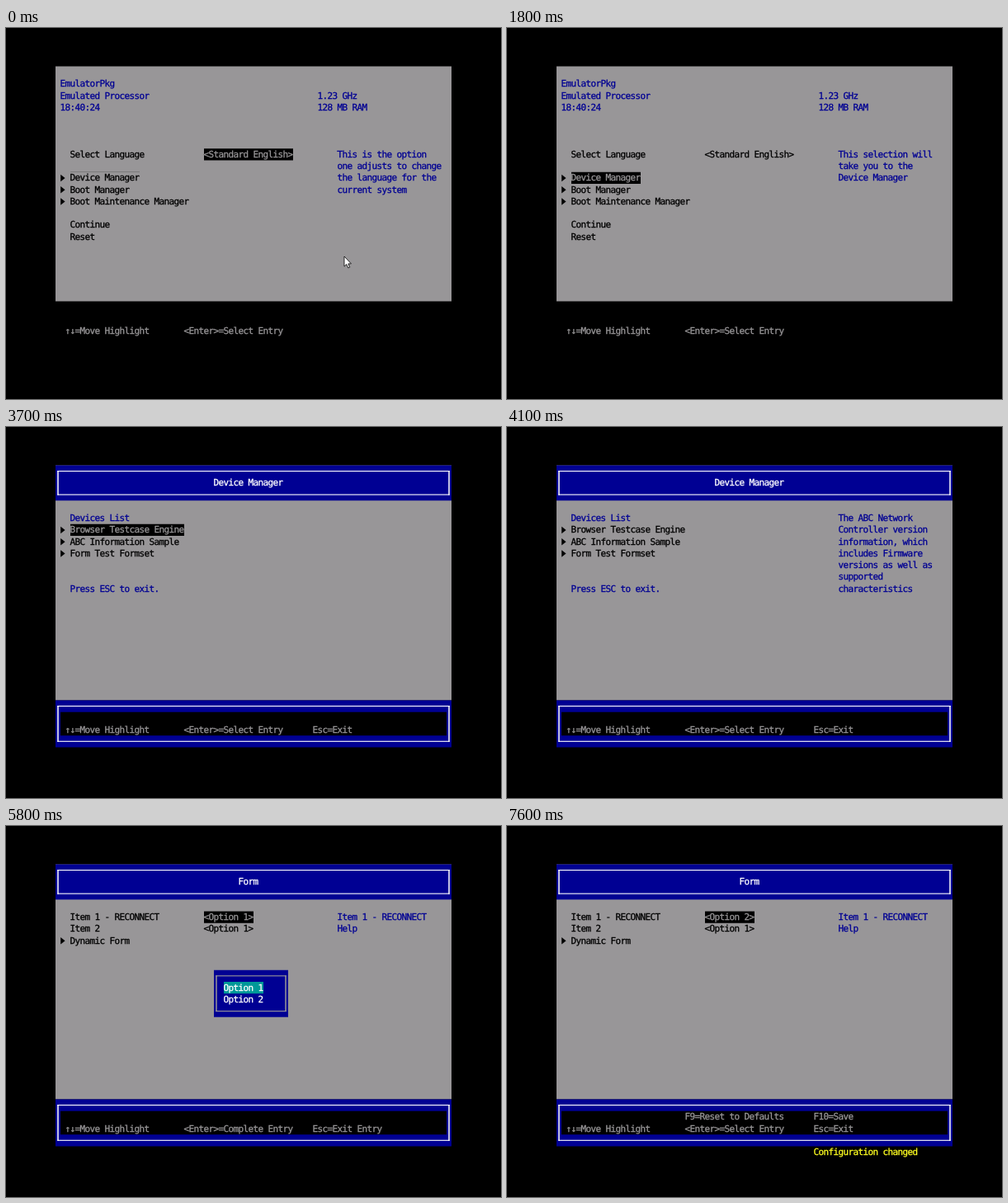
These frames come from a looping animation (600x450 px, 8 s). An HTML page:

```html
<!DOCTYPE html>
<html lang="en">
<head>
<meta charset="utf-8">
<title>Firmware setup</title>
<style>
html, body { margin: 0; width: 100%; height: 100%; overflow: hidden; background: #000; }
svg { display: block; width: 600px; height: 450px; }
text {
  font: 11px "DejaVu Sans Mono", monospace;
  letter-spacing: calc(6px - 1ch);
  font-variant-ligatures: none;
  text-rendering: geometricPrecision;
  stroke-width: .3px;
  white-space: pre;
}
.fade { animation: fade 8s infinite; }
@keyframes fade {
  0% { opacity: 1; animation-timing-function: steps(18, end); }
  22.5%, 100% { opacity: 0; }
}
</style>
</head>
<body>
<svg id="stage" viewBox="0 0 600 450"></svg>
<script>
const LOOP = 8000;
const GRAY = '#989698', BLUE = '#000093', BLACK = '#000', WHITE = '#fff',
      CYAN = '#009898', YELLOW = '#ffff20';
const stage = document.getElementById('stage');
const sheet = document.head.appendChild(document.createElement('style')).sheet;
let parent = stage, layers = 0;

// Text grid: 80 columns, 25 rows
const X = col => 60 + 6 * col;
const Y = row => 46.5 + 14.25 * row;

function add(tag, attrs, content = '') {
  const node = document.createElementNS('http://www.w3.org/2000/svg', tag);
  for (const name in attrs) node.setAttribute(name, attrs[name]);
  node.textContent = content;
  return parent.appendChild(node);
}

function rect(x, y, width, height, fill) {
  add('rect', { x, y, width, height, fill });
}

function box(col, row, cols, rows, fill) {
  rect(X(col), Y(row), 6 * cols, 14.25 * rows, fill);
}

function text(col, row, str, fill = BLACK, back) {
  if (back) box(col, row, str.length, 1, back);
  add('text', { x: X(col) - .6, y: Y(row) + 10.6, fill, stroke: fill }, str);
}

function lines(col, row, list, fill) {
  list.forEach((str, i) => text(col, row + i, str, fill));
}

function entry(row, str) {
  const y = Y(row) + 7.2;
  add('path', { d: `M66.2 ${y - 4.3}L71.6 ${y}L66.2 ${y + 4.3}Z`, fill: BLACK });
  text(3, row, str);
}

function marked(col, row, str) {
  text(col, row, str, GRAY, BLACK);
}

// Box-drawing lines run through the cell centres
function hLine(x1, x2, row, fill) { rect(x1, Y(row) + 6.5, x2 - x1, 1.1, fill); }
function vLine(col, y1, y2, fill) { rect(X(col) + 2.25, y1, 1.5, y2 - y1, fill); }

function frame(col, row, cols, rows, fill) {
  const right = col + cols - 1, bottom = row + rows - 1;
  const x1 = X(col) + 2.25, x2 = X(right) + 3.75;
  const y1 = Y(row) + 6.5, y2 = Y(bottom) + 7.6;
  hLine(x1, x2, row, fill);
  hLine(x1, x2, bottom, fill);
  vLine(col, y1, y2, fill);
  vLine(right, y1, y2, fill);
}

function group(attrs, draw) {
  const outer = parent;
  parent = add('g', attrs);
  draw();
  parent = outer;
}

// Shows a layer from one time to another, in ms
function during(from, to, draw) {
  const name = 'layer' + layers++;
  const at = (ms, value) => `${ms / LOOP * 100}% { visibility: ${value} }`;
  sheet.insertRule(`@keyframes ${name} {
    ${from > 0 ? at(0, 'hidden') : ''} ${at(from, 'visible')}
    ${to < LOOP ? at(to, 'hidden') + at(LOOP, 'hidden') : at(LOOP, 'visible')} }`);
  group({ style: `animation: ${name} ${LOOP}ms step-end infinite` }, draw);
}

// Front page
during(0, 3100, () => {
  box(0, 0, 80, 20, GRAY);
  lines(1, 1, ['EmulatorPkg', 'Emulated Processor', '18:40:24'], BLUE);
  lines(53, 2, ['1.23 GHz', '128 MB RAM'], BLUE);
  text(3, 7, 'Select Language');
  text(30, 7, '<Standard English>');
  entry(9, 'Device Manager');
  marked(3, 9, 'Device Manager');
  entry(10, 'Boot Manager');
  entry(11, 'Boot Maintenance Manager');
  lines(3, 13, ['Continue', 'Reset']);
  lines(57, 7, ['This selection will', 'take you to the', 'Device Manager'], BLUE);
});

during(0, 1800, () => group({ class: 'fade' }, () => {
  marked(30, 7, '<Standard English>');
  text(3, 9, 'Device Manager', BLACK, GRAY);
  box(57, 7, 22, 4, GRAY);
  lines(57, 7, ['This is the option', 'one adjusts to change', 'the language for the',
    'current system'], BLUE);
  add('path', {
    d: 'M410 277V289.2L412.8 286.6L414.8 291L416.7 290.2L414.8 285.9H418.4Z',
    fill: WHITE, stroke: BLACK, 'stroke-width': .8
  });
}));

// Form pages
during(3100, LOOP, () => {
  box(0, 0, 80, 20, GRAY);
  box(0, 0, 80, 3, BLUE);
  frame(0, 0, 80, 3, WHITE);
  box(0, 20, 80, 4, BLUE);
  frame(0, 20, 80, 4, WHITE);
  box(1, 21, 78, 2, BLACK);
});

// Key help
text(2, 22, '↑↓=Move Highlight', GRAY);
const selectKey = () => text(26, 22, '<Enter>=Select Entry', GRAY);
const exitKey = () => text(52, 22, 'Esc=Exit', GRAY);
const formKeys = () => {
  text(26, 21, 'F9=Reset to Defaults', GRAY);
  text(52, 21, 'F10=Save', GRAY);
};
during(0, 5700, selectKey);
during(3400, 5700, exitKey);
during(4700, 5700, formKeys);
during(5700, 7100, () => {
  text(26, 22, '<Enter>=Complete Entry', GRAY);
  text(52, 22, 'Esc=Exit Entry', GRAY);
});
during(7100, LOOP, () => {
  selectKey();
  exitKey();
  formKeys();
  text(52, 24, 'Configuration changed', YELLOW);
});

// Device Manager
during(3100, 4500, () => text(32, 1, 'Device Manager', WHITE));
during(3100, 3200, () => lines(3, 13, ['Continue', 'Reset']));
const devices = ['Browser Testcase Engine', 'ABC Information Sample', 'Form Test Formset'];
during(3200, 4500, () => {
  text(3, 4, 'Devices List', BLUE);
  devices.forEach((name, i) => entry(5 + i, name));
  text(3, 10, 'Press ESC to exit.', BLUE);
});
[[3300, 3900], [3900, 4100], [4200, 4500]].forEach(([from, to], i) =>
  during(from, to, () => marked(3, 5 + i, devices[i])));
during(3900, 4400, () => lines(57, 4, ['The ABC Network', 'Controller version',
  'information, which', 'includes Firmware', 'versions as well as', 'supported',
  'characteristics'], BLUE));

// Form
during(4500, LOOP, () => text(37, 1, 'Form', WHITE));
during(4600, LOOP, () => {
  lines(3, 4, ['Item 1 - RECONNECT', 'Item 2']);
  text(30, 5, '<Option 1>');
  entry(6, 'Dynamic Form');
  lines(57, 4, ['Item 1 - RECONNECT', 'Help'], BLUE);
});
during(4600, 7100, () => marked(30, 4, '<Option 1>'));
during(7100, LOOP, () => marked(30, 4, '<Option 2>'));

// Option list
const options = picked => {
  frame(32, 9, 15, 4, GRAY);
  for (const i of [1, 2]) text(34, 9 + i, 'Option ' + i, WHITE, i === picked && CYAN);
};
during(5700, 7100, () => box(32, 9, 15, 4, BLUE));
during(5800, 6600, () => options(1));
during(6600, 6700, () => {
  hLine(X(32) + 2.25, X(43), 9, GRAY);
  vLine(32, Y(9) + 6.5, Y(10), GRAY);
});
during(6700, 7100, () => options(2));
</script>
</body>
</html>
```
